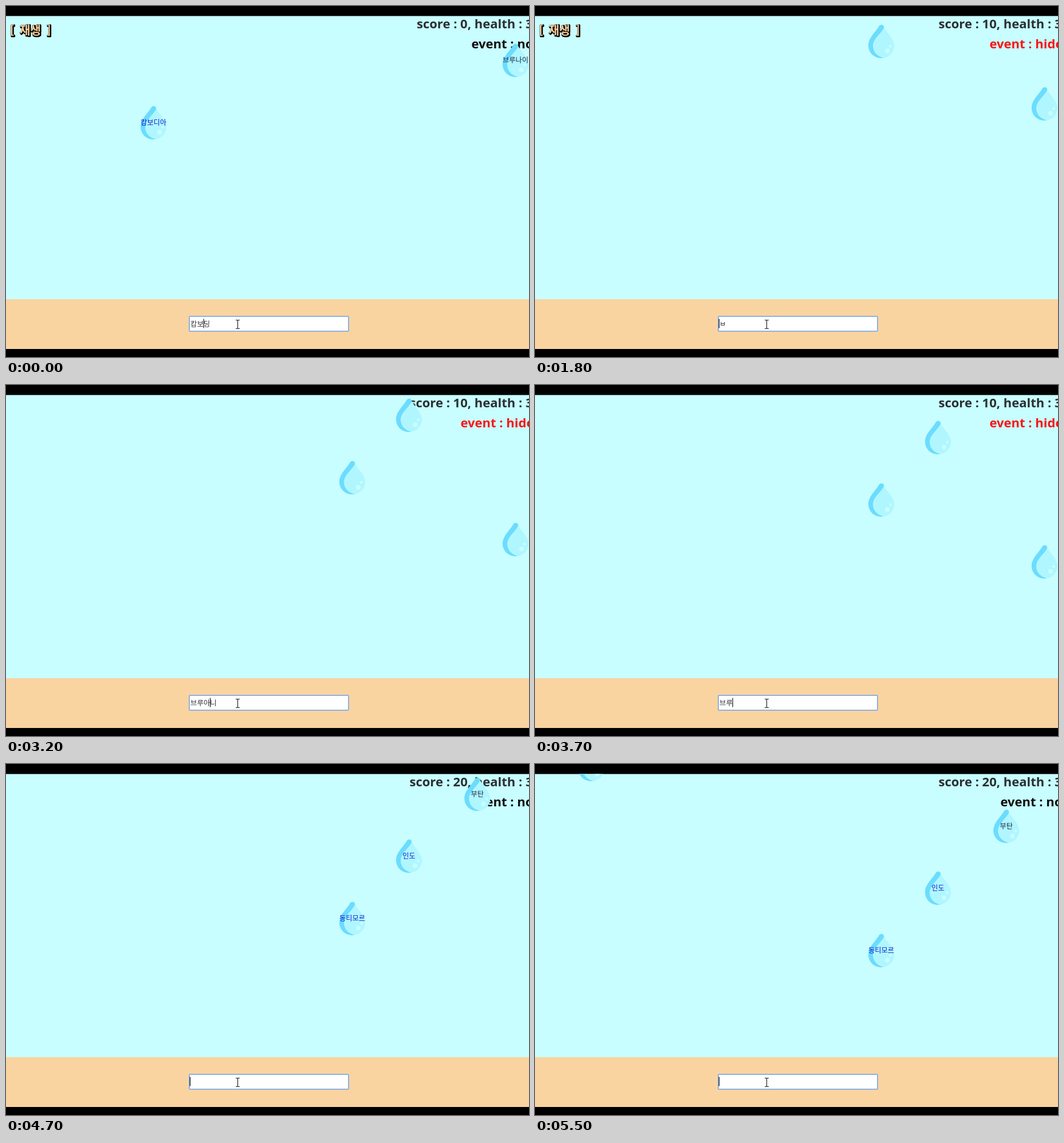
Recreate the animation shown at these times as an HTML page. Size 913 by 613 pixels, loop 5.6 s.

```html
<!DOCTYPE html>
<html lang="ko">
<head>
<meta charset="utf-8">
<title>Word rain</title>
<style>
  html, body { margin: 0; width: 100%; height: 100%; overflow: hidden; background: #000; }
  svg { display: block; }
  text { white-space: pre; }
  .hud { font: 700 22px "Open Sans", "Noto Sans", sans-serif; }
  .ko { font-family: "Noto Sans CJK KR", "Noto Sans CJK", sans-serif; }
  .word { font-size: 12.2px; text-anchor: middle; }
  .typed { font-size: 12.4px; fill: #333; }
  .play { font-size: 20px; font-weight: 700; }
</style>
</head>
<body>
<svg width="913" height="613" viewBox="0 0 913 613">
  <defs>
    <clipPath id="sky"><rect y="17.5" width="913" height="494.5"/></clipPath>
    <g id="drop">
      <path fill="#b0f6ff" d="M-4 3C-9 13-22.5 23-22.5 36C-22.5 49-12 58 0 58C12 58 22.5 49 22.5 36C22.5 24 9 13 4 3Z"/>
      <path fill="#6bdcff" d="M-4.2 2.6C-9 12-22.5 22-22.5 36C-22.5 49-12 58 0 58L4 57.6C-8 55-14.5 46-14.5 37C-14.5 24-1 16 4.3 5.5C6.5 0-1.5-2.5-4.2 2.6Z"/>
      <circle cx="10.5" cy="45.5" r="4" fill="#c8feff"/>
      <circle cx="16" cy="37" r="2.4" fill="#c8feff"/>
    </g>
    <g id="label">
      <text class="ko play" y="50"><tspan x="7">[</tspan><tspan x="24">재생</tspan><tspan x="71">]</tspan></text>
    </g>
  </defs>
  <rect width="913" height="613"/>
  <rect y="17.5" width="913" height="494.5" fill="#c8feff"/>
  <rect y="512" width="913" height="87" fill="#f9d4a0"/>
  <g id="play">
    <use href="#label" x="1" y="1" stroke="#000" stroke-width="3" stroke-linejoin="round"/>
    <use href="#label" fill="#ffd29c"/>
  </g>
  <text id="score" class="hud" y="39" fill="#2b2f33"></text>
  <text id="event" class="hud" y="73.5"></text>
  <g id="rain" clip-path="url(#sky)"></g>
  <rect x="320" y="542" width="278" height="26" rx="1.5" fill="#fff" stroke="#8fb1e0" stroke-width="2"/>
  <text id="typed" class="ko typed" x="322" y="559.5"></text>
  <rect id="caret" y="546.5" width="1.2" height="16" fill="#111"/>
  <path fill="none" stroke="#222" stroke-width="1.2" d="M401 548.5h2.5l1 1l1-1h2.5M404.5 549.5v13M401 563.5h2.5l1-1l1 1h2.5"/>
</svg>
<script>
const LOOP = 5600, HOLD = 800, TICK = 100;
const FIRST_HIT = 1100, SECOND_HIT = 4500, PLAY_GONE = 2200;
const CHAR = 11.4, TEXT_X = 322;
const BLUE = '#0a1fd0', NAVY = '#14284c';
const $ = id => document.getElementById(id);

// [tick, fallen distance]
const fall = [[0, 0], [5, 32], [17, 119], [25, 175], [30, 214], [40, 283], [48, 339]];

const drops = [
  { x: 257.5, word: '캄보디아', color: BLUE, end: FIRST_HIT },
  { x: 889.5, word: '브루나이', color: NAVY, end: SECOND_HIT },
  { x: 604.5, word: '동티모르', color: BLUE, end: LOOP },
  { x: 703.5, word: '인도', color: BLUE, end: LOOP },
  { x: 822.8, word: '부탄', color: NAVY, end: LOOP },
  { x: 98, word: '', color: BLUE, end: LOOP }
];

// [time, text, characters before the caret]
const edits = [
  [0, '캄보딩', 2], [800, '캄보디아', 3], [FIRST_HIT, '', 0],
  [1700, 'ㅂ', 0], [1900, '브', 0], [2200, '브ㄹ', 1], [2400, '브루', 1],
  [2600, '브룽', 1], [2800, '브루아', 2], [3000, '브루안', 2], [3200, '브루아니', 3],
  [3400, '브루안', 2], [3500, '브루아', 2], [3600, '브루ㅇ', 2], [3700, '브루', 2],
  [3900, '브루ㄴ', 2], [4000, '브루나', 2], [4200, '브루낭', 2], [4300, '브루나이', 3],
  [SECOND_HIT, '', 0]
];

function add(parent, tag, attrs) {
  const node = document.createElementNS('http://www.w3.org/2000/svg', tag);
  for (const key in attrs) node.setAttribute(key, attrs[key]);
  return parent.appendChild(node);
}

for (const d of drops) {
  d.node = add($('rain'), 'g', {});
  add(d.node, 'use', { href: '#drop' });
  d.text = add(d.node, 'text', { class: 'ko word', y: 32.5, fill: d.color });
  d.text.textContent = d.word;
}

function show(node, on) {
  node.setAttribute('visibility', on ? 'inherit' : 'hidden');
}

function fallen(tick) {
  let i = 1;
  while (i < fall.length - 1 && tick > fall[i][0]) i++;
  const [a, from] = fall[i - 1], [b, to] = fall[i];
  return from + (to - from) * (tick - a) / (b - a);
}

function drawRain(t, hidden) {
  const tick = t < HOLD ? 0 : Math.floor((t - HOLD) / TICK) + 1;
  const dist = fallen(tick);
  drops.forEach((d, i) => {
    const y = Math.round(174.6 - 108.4 * i + dist);
    d.node.setAttribute('transform', `translate(${d.x} ${y})`);
    show(d.node, t < d.end && y > -60);
    show(d.text, !hidden);
  });
}

function drawHud(t, hidden) {
  const score = t < FIRST_HIT ? 0 : t < SECOND_HIT ? 10 : 20;
  $('score').textContent = `score : ${score}, health : 3`;
  $('score').setAttribute('x', score ? 704.5 : 717);
  $('event').textContent = hidden ? 'event : hide' : 'event : no';
  $('event').setAttribute('x', hidden ? 793.5 : 812.5);
  $('event').setAttribute('fill', hidden ? '#ff1414' : '#0c0c0c');
  show($('play'), t < PLAY_GONE);
}

function drawInput(t) {
  const [start, text, before] = edits.filter(e => e[0] <= t).pop();
  const blinkOn = t < HOLD || Math.floor((t - start) / 500) % 2 === 0;
  $('typed').textContent = text;
  $('caret').setAttribute('x', before ? TEXT_X - 0.3 + before * CHAR : 320.8);
  show($('caret'), blinkOn);
}

function draw(time) {
  const t = time % LOOP;
  const hidden = t >= FIRST_HIT && t < SECOND_HIT;
  drawRain(t, hidden);
  drawHud(t, hidden);
  drawInput(t);
}

const begin = performance.now();
function loop() {
  draw(performance.now() - begin);
  requestAnimationFrame(loop);
}
loop();
</script>
</body>
</html>
```
